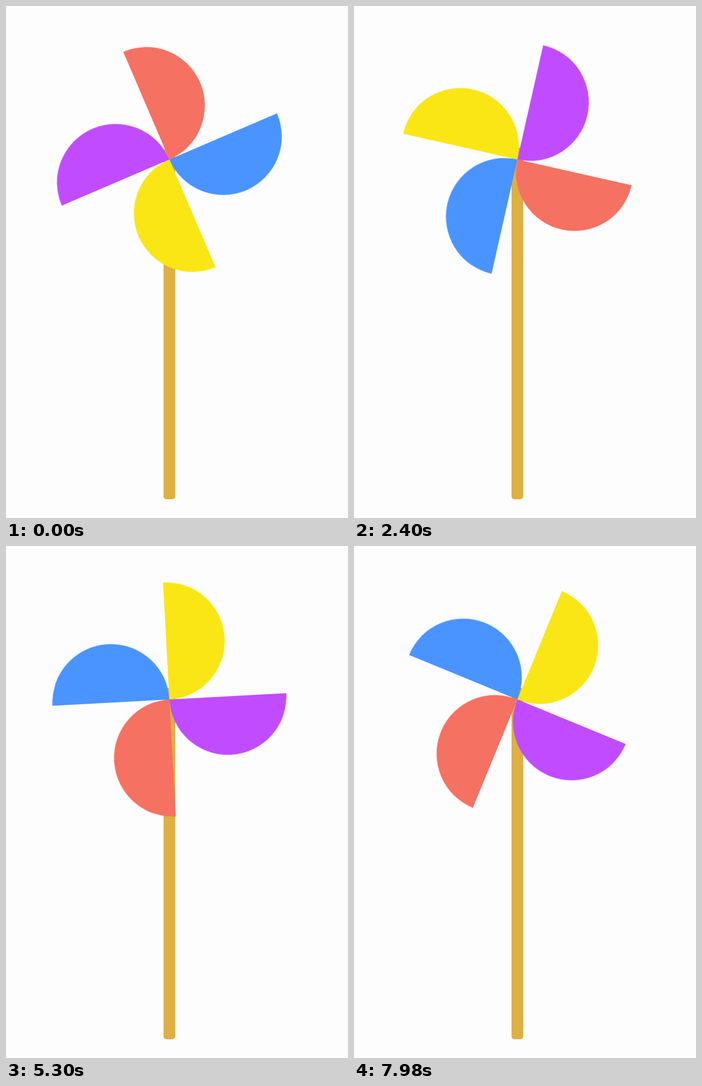
These frames come from a looping animation (584x874 px, 8000 ms). An HTML page:

```html
<!DOCTYPE html>
<html lang="en">
<head>
<meta charset="utf-8">
<title>Pinwheel</title>
<style>
  html, body { margin: 0; width: 100%; height: 100%; overflow: hidden; background: #fdfdfd; }
  svg { display: block; width: 584px; height: 874px; }
</style>
</head>
<body>
<svg viewBox="0 0 584 874">
  <defs>
    <path id="blade" d="M0 0V-200A100 100 0 0 1 0 0Z"/>
  </defs>
  <rect x="269" y="242" width="20" height="600" rx="5" fill="#deb044"/>
  <g transform="translate(279 262)">
    <g id="wheel">
      <use href="#blade" fill="#f57161"/>
      <use href="#blade" fill="#4a94ff" transform="rotate(90)"/>
      <use href="#blade" fill="#fae615" transform="rotate(180)"/>
      <use href="#blade" fill="#c14cff" transform="rotate(270)"/>
    </g>
  </g>
</svg>
<script>
const LOOP = 8000;
const TURN_STEPS = 240;   // steps in one eased turn
const FIRST_STEP = 111;   // where in the turn the loop begins

const spin = document.getElementById('wheel').animate(
  [{ transform: 'rotate(180deg)' }, { transform: 'rotate(540deg)' }],
  { duration: TURN_STEPS, easing: 'ease-in-out', fill: 'both' }
);
spin.pause();

// Steps last 20, 100 and 20 ms, repeating every 140 ms.
function stepAt(ms) {
  const rest = ms % 140;
  return 3 * Math.floor(ms / 140) + (rest >= 20) + (rest >= 120);
}

const start = performance.now();

function draw() {
  const ms = (performance.now() - start) % LOOP;
  spin.currentTime = (stepAt(ms) + FIRST_STEP) % TURN_STEPS;
  requestAnimationFrame(draw);
}
draw();
</script>
</body>
</html>
```
